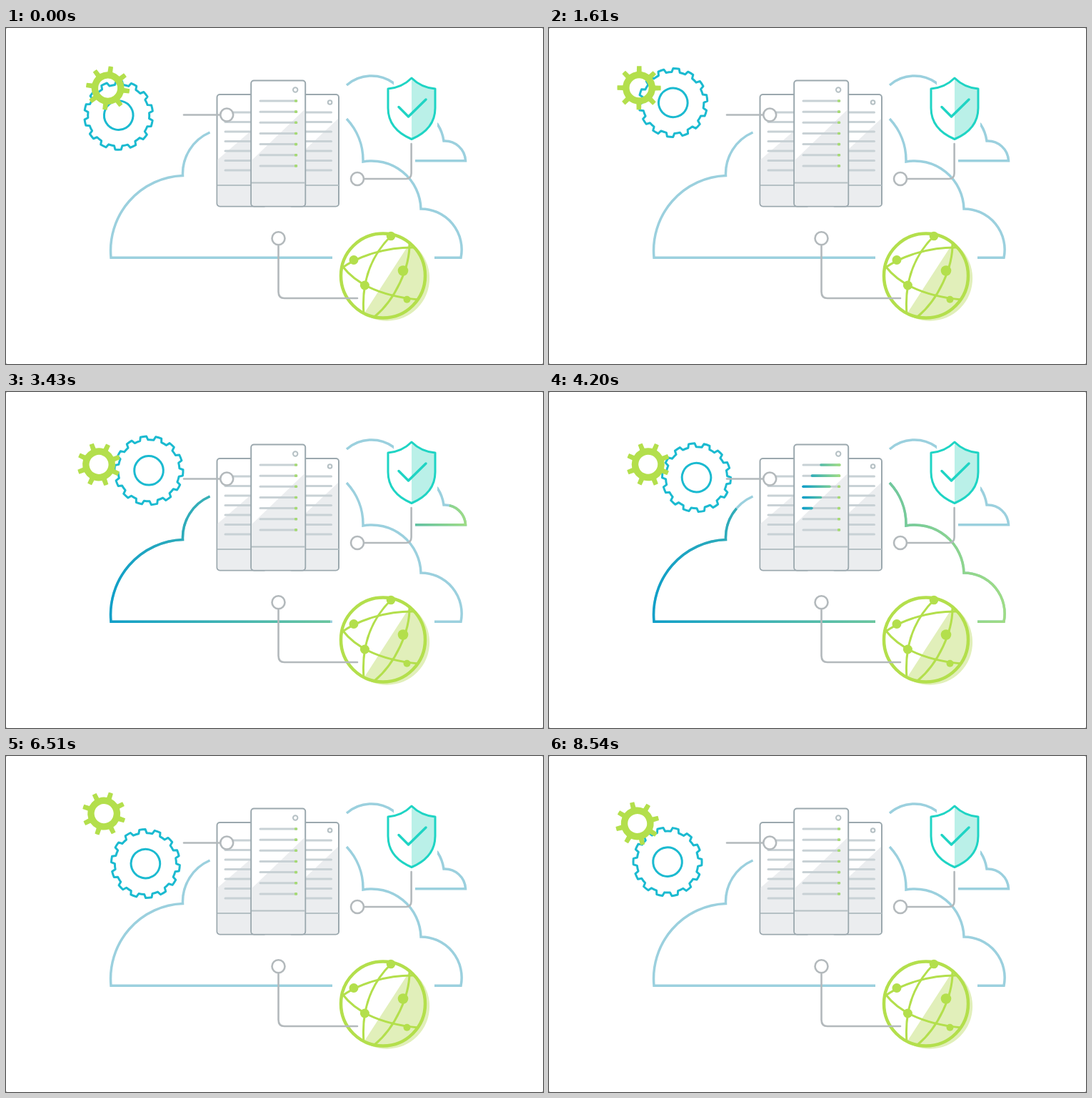
An HTML page for the animation above (8610 ms loop, 752 by 470 pixels).

```html
<!DOCTYPE html>
<html lang="en">
<head>
<meta charset="utf-8">
<title>Cloud hosting</title>
<style>
  html, body { margin: 0; width: 100%; height: 100%; overflow: hidden; background: #999; }
  svg { display: block; width: 752px; height: 470px; }
  .cloud { fill: none; stroke: #9bd0de; stroke-width: 3.5; }
  .case { fill: #fff; stroke: #9ba8ae; stroke-width: 2; }
  .shade { fill: #ebedef; }
  .seam, .lamp { fill: none; stroke: #b5c0c4; stroke-width: 2; }
  .rows line { stroke: #c8d1d5; stroke-width: 3; stroke-linecap: round; }
  .glow line { stroke-width: 3.6; stroke-linecap: round; }
  .wire { fill: none; stroke: #b3b9bc; stroke-width: 2.6; stroke-linecap: round; }
  .wire circle { fill: #fff; }
  .globe path { fill: none; stroke: #b3df4c; stroke-width: 3; }
</style>
</head>
<body>
<svg viewBox="0 0 752 470">
  <defs id="defs"></defs>
  <rect width="752" height="470" rx="2" fill="#fff"/>

  <path class="cloud" id="smallBase"/>
  <path class="cloud" id="smallGlow"/>
  <rect x="543" y="60" width="61" height="115" fill="#fff"/>
  <path class="cloud" id="mainBase"/>
  <path class="cloud" id="mainGlow"/>
  <rect x="457" y="316" width="143" height="11" fill="#fff"/>

  <g id="bigGear" fill="none" stroke="#1bbad0" stroke-width="3" stroke-linejoin="round">
    <path/><circle r="20.3"/>
  </g>
  <path id="smallGear" fill="#b3df4c" fill-rule="evenodd"/>

  <g id="sides">
    <rect class="case" x="295.5" y="93" width="70" height="156.5" rx="4"/>
    <rect class="case" x="396" y="93" width="70" height="156.5" rx="4"/>
    <path class="shade" d="M296.5 184L343 144V248.5H300Q296.5 248.5 296.5 245Z"/>
    <path class="shade" d="M419 170L465 127V245Q465 248.5 462 248.5H419Z"/>
    <path class="seam" d="M296 220H343M419 220H466"/>
    <circle class="lamp" cx="453.6" cy="104" r="2.8"/>
    <g class="rows"></g>
    <g class="glow"></g>
  </g>
  <g id="middle">
    <rect class="case" x="343.2" y="73.5" width="76" height="176" rx="4"/>
    <path class="shade" d="M344.2 185L418.2 114V245Q418.2 248.5 415 248.5H347Q344.2 248.5 344.2 245Z"/>
    <path class="seam" d="M344 216.5H418.5"/>
    <circle class="lamp" cx="405.2" cy="86.5" r="3.2"/>
    <g class="rows"></g>
    <g class="glow"></g>
  </g>

  <g class="globe">
    <circle cx="528" cy="346.5" r="59" fill="#fff"/>
    <path d="M566 300L501 400A59 59 0 0 0 566 300Z" style="fill:#e1efba;stroke:none"/>
    <path d="M539 291C515 315 497 350 501 400"/>
    <path d="M565 300C566 335 545 380 516 404"/>
    <path d="M470 336C495 318 535 306 573 307"/>
    <path d="M471 333C490 358 525 375 578 380"/>
    <circle cx="528" cy="346.5" r="59" fill="none" stroke="#b3df4c" stroke-width="4.5"/>
    <g fill="#b3df4c">
      <circle cx="539" cy="291" r="6.3"/>
      <circle cx="487" cy="324.5" r="6.5"/>
      <circle cx="556" cy="339.5" r="7.3"/>
      <circle cx="502.4" cy="360" r="6.5"/>
      <circle cx="561.5" cy="379.7" r="5"/>
    </g>
  </g>

  <g class="wire">
    <path d="M249 121.5H300"/><circle cx="309.2" cy="121.5" r="9"/>
    <path d="M501 211H560Q567.6 211 567.6 203V162"/><circle cx="492" cy="211" r="9"/>
    <path d="M381.5 303V369Q381.5 378 390 378H492"/><circle cx="381.5" cy="294.3" r="9"/>
  </g>

  <g stroke="#1fd4c4" stroke-width="3" stroke-linejoin="round" fill="none">
    <path d="M568 70V155.5C588 147 601 134 601 112V85C589 84 578 80 568 70Z" fill="#baf0e8" stroke="none"/>
    <path d="M568 70C558 80 547 84 535 85V112C535 134 548 147 568 155.5C588 147 601 134 601 112V85C589 84 578 80 568 70Z"/>
    <path d="M550 110.5L563.5 124L588 100" stroke-width="3.5" stroke-linecap="round"/>
  </g>
</svg>
<script>
const LOOP = 8610, STEP = 70;
const SPIN = 360 / 10400;        // big gear, degrees per ms
const SWEEP = 0.125;             // row light, px per ms
const STAGGER = 100;
const NS = 'http://www.w3.org/2000/svg';
const $ = selector => document.querySelector(selector);

function add(parent, tag, attrs) {
  const node = document.createElementNS(NS, tag);
  for (const key in attrs) node.setAttribute(key, attrs[key]);
  return parent.appendChild(node);
}

function gradient(id, x1, x2) {
  const node = add($('#defs'), 'linearGradient',
    { id, x1, x2, y1: 0, y2: 0, gradientUnits: 'userSpaceOnUse' });
  add(node, 'stop', { offset: 0, 'stop-color': '#109fc8' });
  add(node, 'stop', { offset: 1, 'stop-color': '#9fdc85' });
  return `url(#${id})`;
}

// Half widths are in degrees.
function gearPath(teeth, root, tip, rootHalf, tipHalf) {
  const at = (r, deg) => {
    const a = deg * Math.PI / 180;
    return `${(r * Math.cos(a)).toFixed(2)} ${(r * Math.sin(a)).toFixed(2)}`;
  };
  let d = '';
  for (let i = 0; i < teeth; i++) {
    const a = i * 360 / teeth;
    d += (i ? `A${root} ${root} 0 0 1 ` : 'M') + at(root, a - rootHalf);
    d += `L${at(tip, a - tipHalf)}A${tip} ${tip} 0 0 1 ${at(tip, a + tipHalf)}L${at(root, a + rootHalf)}`;
  }
  return d + `A${root} ${root} 0 0 1 ${at(root, -rootHalf)}Z`;
}

const ringHole = r => `M${r} 0A${r} ${r} 0 1 0 ${-r} 0A${r} ${r} 0 1 0 ${r} 0Z`;

$('#bigGear path').setAttribute('d', gearPath(14, 43, 48, 7.6, 5));
$('#smallGear').setAttribute('d', gearPath(8, 23, 30.6, 8.6, 6) + ringHole(13.5));

function makeCloud(name, d, x1, x2) {
  const glow = $(`#${name}Glow`);
  $(`#${name}Base`).setAttribute('d', d);
  glow.setAttribute('d', d);
  glow.setAttribute('pathLength', 1);
  glow.style.stroke = gradient(name + 'Ink', x1, x2);
  return glow;
}

const smallCloud = makeCloud('small',
  'M477 80A53 53 0 0 1 542 76.5L604.5 135A56 56 0 0 1 613 158A29 29 0 0 1 643.5 185.7H573', 477, 645);
const mainCloud = makeCloud('main',
  'M285.5 146A63 63 0 0 0 247.5 206.5A105 105 0 0 0 147 321.3H637A57 57 0 0 0 581 253A69 69 0 0 0 500 187A85 85 0 0 0 477 127', 147, 637);

// Seven rows of one server, each with a light that runs left to right.
function makeRows(server, o) {
  const stroke = gradient(o.id, o.from, o.to);
  const lights = [];
  for (let i = 0; i < 7; i++) {
    const y = o.y + i * o.gap;
    add($(server + ' .rows'), 'line', { x1: o.from, x2: o.to, y1: y, y2: y });
    if (o.dots) add($(server + ' .rows'), 'rect',
      { x: o.to - 3, y: y - 1.8, width: 4, height: 3.6, rx: 1, fill: '#a6da74' });
    lights.push(add($(server + ' .glow'), 'line', { y1: y, y2: y, stroke }));
  }
  return { ...o, lights };
}

const rowSets = [
  makeRows('#sides', { id: 'leftInk', from: 307, to: 352, y: 118, gap: 13.5, start: 4620, dash: 30 }),
  makeRows('#sides', { id: 'rightInk', from: 405, to: 455.5, y: 118, gap: 13.5, start: 4724, dash: 30 }),
  makeRows('#middle', { id: 'middleInk', from: 356, to: 407, y: 102, gap: 15.15, start: 3704, dash: 37, dots: true })
];

const clamp = (v, lo, hi) => Math.min(hi, Math.max(lo, v));
const ease = u => u < 0.5 ? 2 * u * u : 1 - 2 * (1 - u) * (1 - u);
const progress = (t, from, to) => ease(clamp((t - from) / (to - from), 0, 1));

function lightCloud(path, head, tail) {
  const length = Math.max(0, head - tail);
  path.style.visibility = length > 0.001 ? 'visible' : 'hidden';
  path.setAttribute('stroke-dasharray', `0 ${tail} ${length} 2`);
}

function lightRows(set, t) {
  set.lights.forEach((line, i) => {
    const head = set.from + (t - set.start - i * STAGGER) * SWEEP;
    const x1 = clamp(head - set.dash, set.from, set.to);
    const x2 = clamp(head, set.from, set.to);
    line.setAttribute('x1', x1);
    line.setAttribute('x2', x2);
    line.style.visibility = x2 > x1 ? 'visible' : 'hidden';
  });
}

// The gears turn about pivots away from their own centres.
function turn(node, x, y, angle, arm, phase) {
  node.setAttribute('transform',
    `translate(${x} ${y}) rotate(${angle}) translate(${arm} 0) rotate(${phase})`);
}

function draw(t) {
  turn($('#bigGear'), 182.5, 128.5, 194.4 + SPIN * t, 25.6, -0.8);
  turn($('#smallGear'), 134.2, 91.2, -40 - SPIN * 7 / 4 * t, 11, 3);
  lightCloud(smallCloud, progress(t, 1900, 3050), progress(t, 2800, 3900));
  lightCloud(mainCloud, progress(t, 2700, 4100), progress(t, 4000, 5690));
  rowSets.forEach(set => lightRows(set, t));
}

const begin = performance.now();
function tick() {
  const t = (performance.now() - begin) % LOOP;
  draw(Math.floor(t / STEP) * STEP);
  requestAnimationFrame(tick);
}
tick();
</script>
</body>
</html>
```
